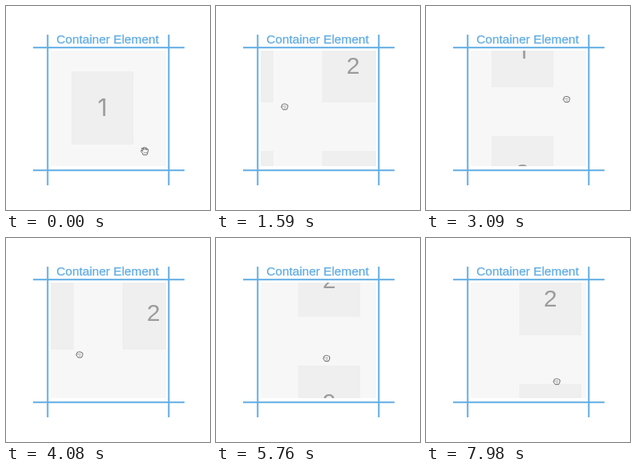
Recreate the animation shown at these times as an HTML page with a canvas. Size 256 px wide and 256 px high, loop 8000 ms.

```html
<!DOCTYPE html>
<html>
<head>
<meta charset="utf-8">
<style>
  html, body { margin: 0; width: 100%; height: 100%; overflow: hidden; background: #fff; }
  canvas { display: block; width: 256px; height: 256px; }
</style>
</head>
<body>
<canvas id="stage"></canvas>
<script>
const LOOP = 8000, STEP = 30, LAG = 60;
const CELL = { w: 78, h: 92, gap: 61, x: 82, y: 82 };
const COLUMNS = 7;
const FONT = '"Liberation Sans", Arial, sans-serif';
const ONE_FONT = 'Inter, sans-serif'; // its 1 has no foot
const BLUE = '#62ade4';

// Times at which the hand holds the grid
const grabs = [[60, 4500], [5430, 6540], [7440, LOOP]];
const isHeld = t => grabs.some(([from, to]) => t >= from && t < to);

const stroke = (from, to, dx, dy) => ({ from, to, dx, dy, held: isHeld(from) });

// Overlapping eased strokes add up to the path of the hand
const strokes = [
  stroke(420, 1230, -88, -52),
  stroke(1450, 2150, 0, -36),
  stroke(2050, 3150, 91, 0),
  stroke(2780, 3650, 0, 79),
  stroke(3400, 4220, -92, -29),
  stroke(4080, 4380, -6, -8),
  stroke(4500, 4950, 89, 60),
  stroke(4950, 5190, -3, -12),
  stroke(5430, 5760, -25, -32),
  stroke(5700, 6270, -44, -37),
  stroke(6540, 6780, -2, 33),
  stroke(6780, 7170, -23, -68),
  stroke(7440, 7760, 20, 20),
  stroke(7790, 8170, 146, 160)
];

const canvas = document.getElementById('stage');
const ctx = canvas.getContext('2d');
const ratio = window.devicePixelRatio || 1;
canvas.width = canvas.height = 256 * ratio;

function ease(u) {
  u = Math.min(1, Math.max(0, u));
  return u * u * (3 - 2 * u);
}

function travel(list, t, x, y) {
  for (const s of list) {
    const k = ease((t - s.from) / (s.to - s.from));
    x += s.dx * k;
    y += s.dy * k;
  }
  return [x, y];
}

const handAt = t => travel(strokes, t, 174, 182);
const panAt = t => travel(strokes.filter(s => s.held), t - LAG, 0, 0);

function drawFrame() {
  ctx.fillStyle = ctx.strokeStyle = BLUE;
  for (const p of [51.3, 203.3]) ctx.fillRect(p, 36, 2, 189);
  for (const p of [51.2, 205.2]) ctx.fillRect(34, p, 190, 2);
  ctx.font = '15.5px ' + FONT;
  ctx.textAlign = 'center';
  ctx.lineWidth = 0.3;
  ctx.fillText('Container Element', 127.5, 46.7);
  ctx.strokeText('Container Element', 127.5, 46.7);
}

function drawCell(x, y, n) {
  ctx.fillStyle = '#efefef';
  ctx.fillRect(x, y, CELL.w, CELL.h);
  ctx.fillStyle = '#9b9b9b';
  ctx.font = '30px ' + (n === 1 ? ONE_FONT : FONT);
  ctx.fillText(n, x + CELL.w / 2, y + 56.2);
}

function drawGrid([px, py]) {
  ctx.save();
  ctx.beginPath();
  ctx.rect(56, 56, 145, 145);
  ctx.clip();
  ctx.fillStyle = '#f7f7f7';
  ctx.fillRect(56, 56, 145, 145);
  ctx.textAlign = 'center';
  for (let row = 0; row < 2; row++) {
    for (let col = 0; col < 3; col++) {
      const x = CELL.x + col * (CELL.w + CELL.gap) + px;
      const y = CELL.y + row * (CELL.h + CELL.gap) + py;
      drawCell(Math.round(x), Math.round(y), row * COLUMNS + col + 1);
    }
  }
  ctx.restore();
}

const openHand = new Path2D(
  'M-2 5.2 L-3 3 L-5 .4 Q-5.3 -1 -4 -.9 L-2.6 .4 L-4 -3 Q-4 -4.4 -2.7 -4 L-1.6 -1.6 ' +
  'L-1.6 -4.6 Q-.8 -5.7 .2 -4.6 L.5 -1.7 L1.2 -4.3 Q2.2 -5 2.8 -4 L2.5 -1.2 ' +
  'L3.7 -2.7 Q5 -2.8 4.8 -1.4 L4.2 2 L3 5.2 Z');
const closedHand = new Path2D(
  'M-2 4 L-3 2.4 L-4.4 .6 Q-4.6 -.8 -3.2 -.8 L-3.4 -2.4 Q-2.8 -3.7 -1.6 -3.2 ' +
  'Q-.4 -4.3 .8 -3.3 Q2.2 -3.9 2.9 -2.7 Q4.6 -2.8 4.4 -.8 L4 1.6 L2.8 4 Z');
const creases = new Path2D('M-.9 3.2 V1 M.9 3.2 V1 M2.5 3.2 V1');
const knuckles = new Path2D('M-2.8 .4 L-1.4 -.6 H2.4 M-.8 1.6 H2');

function drawHand([x, y], closed) {
  ctx.save();
  ctx.translate(x, y);
  ctx.scale(0.93, 0.93);
  ctx.lineJoin = 'round';
  ctx.fillStyle = '#fff';
  ctx.strokeStyle = '#555';
  const shape = closed ? closedHand : openHand;
  ctx.fill(shape);
  ctx.lineWidth = 1;
  ctx.stroke(shape);
  ctx.lineWidth = 0.6;
  ctx.stroke(closed ? knuckles : creases);
  ctx.restore();
}

function render(t) {
  ctx.setTransform(ratio, 0, 0, ratio, 0, 0);
  ctx.fillStyle = '#fff';
  ctx.fillRect(0, 0, 256, 256);
  drawFrame();
  drawGrid(panAt(t));
  drawHand(handAt(t), isHeld(t));
}

const start = performance.now();
function tick() {
  const t = (performance.now() - start) % LOOP;
  render(Math.floor(t / STEP) * STEP);
  requestAnimationFrame(tick);
}
tick();
</script>
</body>
</html>
```
